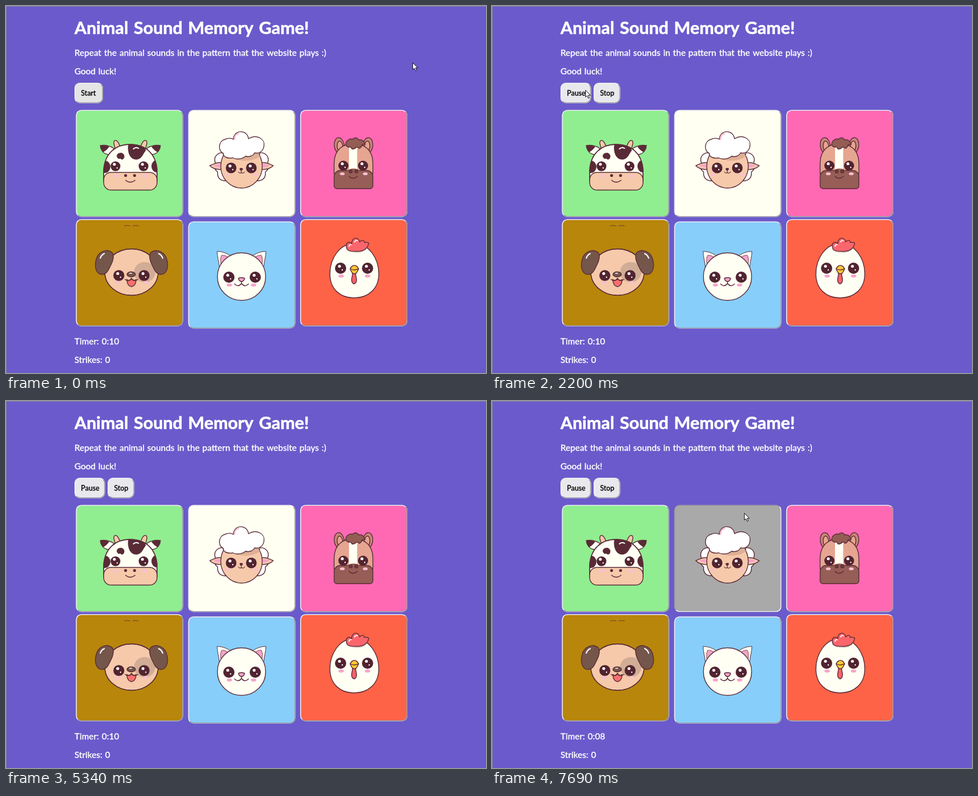
Write an HTML page with a canvas that moves like this. It is 855x655 px and loops after 8 s.

```html
<!DOCTYPE html>
<html lang="en">
<head>
<meta charset="utf-8">
<title>Animal Sound Memory Game</title>
<style>
  html, body { margin: 0; width: 100%; height: 100%; overflow: hidden; background: #6a5acd; }
  canvas { display: block; }
</style>
</head>
<body>
<canvas id="stage" width="855" height="655"></canvas>
<script>
const ctx = document.getElementById('stage').getContext('2d');
const LOOP = 8000;
const INK = '#5a2b36', CREAM = '#fffff4', PEACH = '#f5c9aa', BLUSH = '#f9bfd0', PINK = '#f6a3cc';
const FONT = 'Lato, "Open Sans", sans-serif';

// Cursor poses: [time, x, y]; null hides it.
const CURSOR = [
  [0, 724, 101], [250, 727, 103], [370, 734, 106], [490, 729, 103], [610, 716, 98], [730, 703, 94], [850, 694, 96],
  [1220, 762, 84], [1340, 832, 70], [1460, 690, 88], [1580, 424, 121], [1700, 212, 145], [1820, 166, 153], [1940, 150, 157],
  [2080, 150, 157], [2200, 166, 150], [2320, 300, 124], [2440, 512, 88], [2560, 690, 67], [2680, 728, 72], [2800, 647, 91],
  [2920, null],
  [5990, 713, 130], [6110, 560, 166], [6230, 449, 200]
];

function shape(path, fill, stroke = INK, width = 1.4) {
  if (fill) { ctx.fillStyle = fill; ctx.fill(path); }
  if (stroke) { ctx.strokeStyle = stroke; ctx.lineWidth = width; ctx.stroke(path); }
}
const draw = (d, fill, stroke, width) => shape(new Path2D(d), fill, stroke, width);
function oval(x, y, rx, ry, fill, stroke = null, turn = 0) {
  const path = new Path2D();
  path.ellipse(x, y, rx, ry, turn, 0, Math.PI * 2);
  shape(path, fill, stroke);
}
function box(x, y, w, h, r, fill, stroke = null) {
  const path = new Path2D();
  path.roundRect(x, y, w, h, r);
  shape(path, fill, stroke);
}
// Draws a part and its reflection about a vertical axis.
function mirrored(axis, part) {
  part();
  ctx.save();
  ctx.translate(axis * 2, 0);
  ctx.scale(-1, 1);
  part();
  ctx.restore();
}
function eyes(left, right, y, r) {
  for (const x of [left, right]) {
    oval(x, y, r, r, '#512430');
    oval(x - 2, y - 3.5, 2.6, 2.6, '#fff');
    oval(x + 3, y + 3, 1.2, 1.2, '#fff');
  }
}
function cheeks(left, right, y, rx, ry, color) {
  oval(left, y, rx, ry, color);
  oval(right, y, rx, ry, color);
}

function bevel(x, y, w, h, fill, sunken = false) {
  const light = '#efeff1', dark = '#9b9b9f', edge = 1.6;
  box(x, y, w, h, 9.5, sunken ? dark : light);
  ctx.save();
  ctx.beginPath();
  ctx.moveTo(x + w, y);
  ctx.lineTo(x + w, y + h);
  ctx.lineTo(x, y + h);
  ctx.lineTo(x + 10, y + h - 10);
  ctx.lineTo(x + w - 10, y + 10);
  ctx.clip();
  box(x, y, w, h, 9.5, sunken ? light : dark);
  ctx.restore();
  box(x + edge, y + edge, w - 2 * edge, h - 2 * edge, 8, fill);
}
// A hairline stroke gives the lettering its medium weight.
function text(str, x, y, size, weight = 500, color = '#fff') {
  ctx.font = `${weight} ${size}px ${FONT}`;
  ctx.wordSpacing = size * 0.07 + 'px';
  ctx.fillStyle = ctx.strokeStyle = color;
  ctx.lineWidth = size * 0.02;
  ctx.fillText(str, x, y);
  ctx.strokeText(str, x, y);
}
function button(label, x, w, fill, sunken) {
  bevel(x, 137, w, 36.5, fill, sunken);
  text(label, x + 11.5, 160, 12.6, 500, '#000');
}

function cow() {
  mirrored(221.5, () => {
    draw('M188 265 C182 266 174 264 171 258 Q168 254 168 249 Q181 247 192 254 Z', CREAM);
    draw('M168 249 Q178 248 184 251 Q180 257 173 261 Q168 255 168 249Z', INK, null);
    draw('M195 257 L192 245 Q192 239 196 240 Q200 241 204 253 Z', PEACH);
  });
  const head = new Path2D('M174 314 V292 C176 264 194 247 221 247 C249 247 267 264 269 292 V314 Z');
  shape(head, CREAM);
  ctx.save();
  ctx.clip(head);
  draw('M218 246 C215 260 221 275 232 274 C242 274 244 264 249 258 L246 246Z', INK, null);
  draw('M197 268 Q198 261 206 262 Q213 265 210 272 Q207 276 203 272 Q200 275 197 268Z', INK, null);
  oval(176, 287, 10, 11, INK);
  oval(269, 286, 10, 11, INK);
  ctx.restore();
  draw('M227 255 q4 -4 9 -1', null, '#fff', 2);
  shape(head, null);
  eyes(195, 245, 286, 8.7);
  box(174, 297, 95, 31.5, 13, PEACH, INK);
  cheeks(196, 247, 303, 5, 2.5, BLUSH);
  oval(213, 302.5, 2.6, 2.6, INK);
  oval(229, 302.5, 2.6, 2.6, INK);
  draw('M213 311 Q221 318 230 311');
}

function sheep() {
  mirrored(419.5, () => {
    draw('M387 262 C376 261 369 270 373 280 C370 287 372 293 377 296 C376 306 381 312 391 312Z', '#fff');
    draw('M385 280 C377 278 369 282 363 285 C369 291 379 293 386 291Z', PEACH);
    draw('M384 282.5 Q376 281.5 369 285 Q376 289 384 288Z', PINK, null);
  });
  const face = new Path2D();
  face.ellipse(419.5, 286, 37, 39, 0, 0, Math.PI * 2);
  shape(face, PEACH);
  ctx.save();
  ctx.clip(face);
  oval(426, 263, 28, 13, '#deb096');
  ctx.restore();
  draw('M405 238 C406 220 430 220 432 237 C446 228 462 237 459.5 250 C458 260 450 264 443 262 C440 268 432 270 427 268 C420 274 409 274 404 271 C394 273 387 269 387 263 C377 259 378 241 390 238 C396 235 402 236 405 238Z', '#fff');
  draw('M407 238 Q407 229 414 228', null, BLUSH, 2.5);
  eyes(401, 437, 289, 9.5);
  draw('M416 290 Q419 288 422 290 Q422 293 419 294 Q416 293 416 290Z', INK, null);
  draw('M419 293 V297 M414 296 Q417 300 419 297 Q422 300 425 296', null, INK, 1.2);
  cheeks(394, 445, 301, 4, 2.2, BLUSH);
}

function horse() {
  mirrored(619, () => {
    oval(593.5, 249, 8.8, 14, '#c98678', INK, -0.12);
    oval(595, 251, 5, 10, '#e6a591', INK, -0.12);
  });
  const head = new Path2D('M584.5 300 V280 C585 256 600 246 619 246 C638 246 653 256 653.5 280 V300Z');
  shape(head, '#e6a591');
  ctx.fillStyle = CREAM;
  ctx.fillRect(611, 250, 14.5, 45);
  draw('M605 247 C606 239 613 236 617 238 C622 233 627 236 628 239 C635 237 638 242 640 247 Q636 246 634 248 Q633 253 629 254 Q627 251 624 252 Q621 256 616 255 Q615 251 611 252 Q606 251 605 247Z', '#945d54');
  eyes(601, 636, 285, 9);
  box(584.5, 293.5, 69, 32.5, [11, 11, 5, 5], '#965e56', INK);
  oval(619, 296, 11, 6, '#965e56');
  oval(614, 295, 2.8, 2.8, '#74413d', INK);
  oval(624, 295, 2.8, 2.8, '#74413d', INK);
  cheeks(599, 640, 299.5, 4.3, 2.5, BLUSH);
  draw('M611 304 Q618 311 626 304');
}

function dog() {
  draw('M211 392.5 q5 -2 10 0 M226 392.5 q5 -2 10 0', null, INK, 0.8);
  const head = new Path2D();
  head.ellipse(223.5, 475, 47.5, 41.5, 0, 0, Math.PI * 2);
  shape(head, PEACH);
  ctx.save();
  ctx.clip(head);
  oval(247, 475, 19, 18, '#d2ad95');
  ctx.restore();
  shape(head, null);
  mirrored(223.5, () => {
    draw('M189 440 C180 433 163 437 160 455 C157 470 163 480 172 479 C181 478 183 469 187 462 C191 455 193 444 189 440Z', '#75564a');
    draw('M168 450 Q170 444 175 442', null, '#fff', 2.2);
  });
  eyes(201, 246, 481, 9.8);
  draw('M215 488 Q216 500 223.5 501 Q231 500 232 488 Q226 492 223.5 487 Q221 492 215 488Z', '#f7706e');
  draw('M212 488 Q219 493 223.5 486 Q228 493 235 488');
  oval(223, 479, 7.5, 4.5, '#74564a', INK);
  draw('M220 477 h4', null, '#fff', 1.4);
  cheeks(200, 249, 493.5, 4.5, 2.5, BLUSH);
}

function cat() {
  mirrored(419.5, () => {
    draw('M380 465 C379 455 376 447 376 438 C386 438 396 442 402 448Z', CREAM, INK, 1);
    draw('M383 462 Q381 451 384 445 Q391 444 397 450Z', PINK, INK, 0.8);
  });
  oval(419.5, 483, 43, 42.5, CREAM, INK);
  eyes(397, 444, 484, 10);
  draw('M414 486 Q419.5 483.5 425 486 Q424 491 419.5 492 Q415 491 414 486Z', PINK);
  draw('M419.5 492 V495 M407 496 Q414 503 419.5 495 Q425 503 432 496');
  cheeks(398, 441, 498, 4.8, 2.8, PINK);
}

function chicken() {
  const head = new Path2D('M620 424 C647 424 664 451 664 478 C664 505 645 521 620 521 C595 521 577 505 577 478 C577 451 594 424 620 424Z');
  shape(head, CREAM);
  ctx.save();
  ctx.clip(head);
  oval(625, 429, 19, 12, '#e8ded7');
  ctx.restore();
  draw('M607 433 C604 423 610 419 616 424 C615 414 627 410 630 421 C634 417 638 417 638 422 Q642 421 646 423 C645 432 638 438 626 438 C616 438 609 438 607 433Z', '#fb666c');
  draw('M611 429 q1 -4 4 -3 M621 421 q2 -4 5 -2', null, '#fff', 1.8);
  eyes(596, 644, 468, 10);
  draw('M617 477 C618 483 614 486 616 492 Q620 500 624 492 C626 486 622 483 623 477Z', '#f7626a');
  draw('M613 469 Q616 463 620.5 463 Q625 463 628 469 Q625 478 620.5 478 Q616 478 613 469Z', '#ffc933');
  draw('M613 469 Q620 473 628 469');
  cheeks(597, 644, 482, 4.8, 2.8, PINK);
}

const TILES = [
  [124.5, 185.5, '#90ee90', cow], [324.5, 185.5, '#fffff2', sheep], [524, 185.5, '#ff69b4', horse],
  [124.5, 380.5, '#b8860b', dog], [324.5, 384.5, '#87cefa', cat], [524, 380.5, '#ff6347', chicken]
];

function cursor(t) {
  const [, x, y] = CURSOR.findLast(pose => pose[0] <= t);
  if (x === null) return;
  ctx.save();
  ctx.translate(x + 0.5, y + 0.5);
  draw('M0 0 V12 L2.8 9.6 L5 14.3 L7 13.4 L4.9 8.8 H8.5Z', '#fff', '#111', 1);
  ctx.restore();
}

function render(t) {
  ctx.fillStyle = '#6a5acb';
  ctx.fillRect(0, 0, 855, 655);
  ctx.fillStyle = '#8c8a97';
  ctx.fillRect(0, 0, 855, 1);
  ctx.fillRect(0, 0, 1, 655);

  text('Animal Sound Memory Game!', 122, 50, 30.9, 700);
  text('Repeat the animal sounds in the pattern that the website plays :)', 122, 89, 15.5);
  text('Good luck!', 122, 122, 15.5);

  if (t < 2200) {
    const fill = t < 1940 ? '#e5e5e6' : t < 2080 ? '#d0d0d7' : '#b1b1b9';
    button('Start', 122, 51, fill, t >= 2080);
  } else {
    button('Pause', 122, 54.5, '#e9e9ed');
    button('Stop', 181, 47.5, '#e9e9ed');
  }

  const pressed = t >= 6350;
  const lit = pressed || (t >= 3170 && t < 5340);
  for (const [x, y, color, animal] of TILES) {
    const active = animal === sheep;
    bevel(x, y, 191, 191, active && lit ? '#a9a9a9' : color, active && pressed);
    animal();
  }

  const left = t < 6650 ? '10' : t < 7690 ? '09' : '08';
  text('Timer: 0:' + left, 122, 604, 15.5);
  text('Strikes: 0', 122, 637, 15.5);
  cursor(t);
}

ctx.lineJoin = ctx.lineCap = 'round';
const start = performance.now();
function tick() {
  render((performance.now() - start) % LOOP);
  requestAnimationFrame(tick);
}
tick();
</script>
</body>
</html>
```
